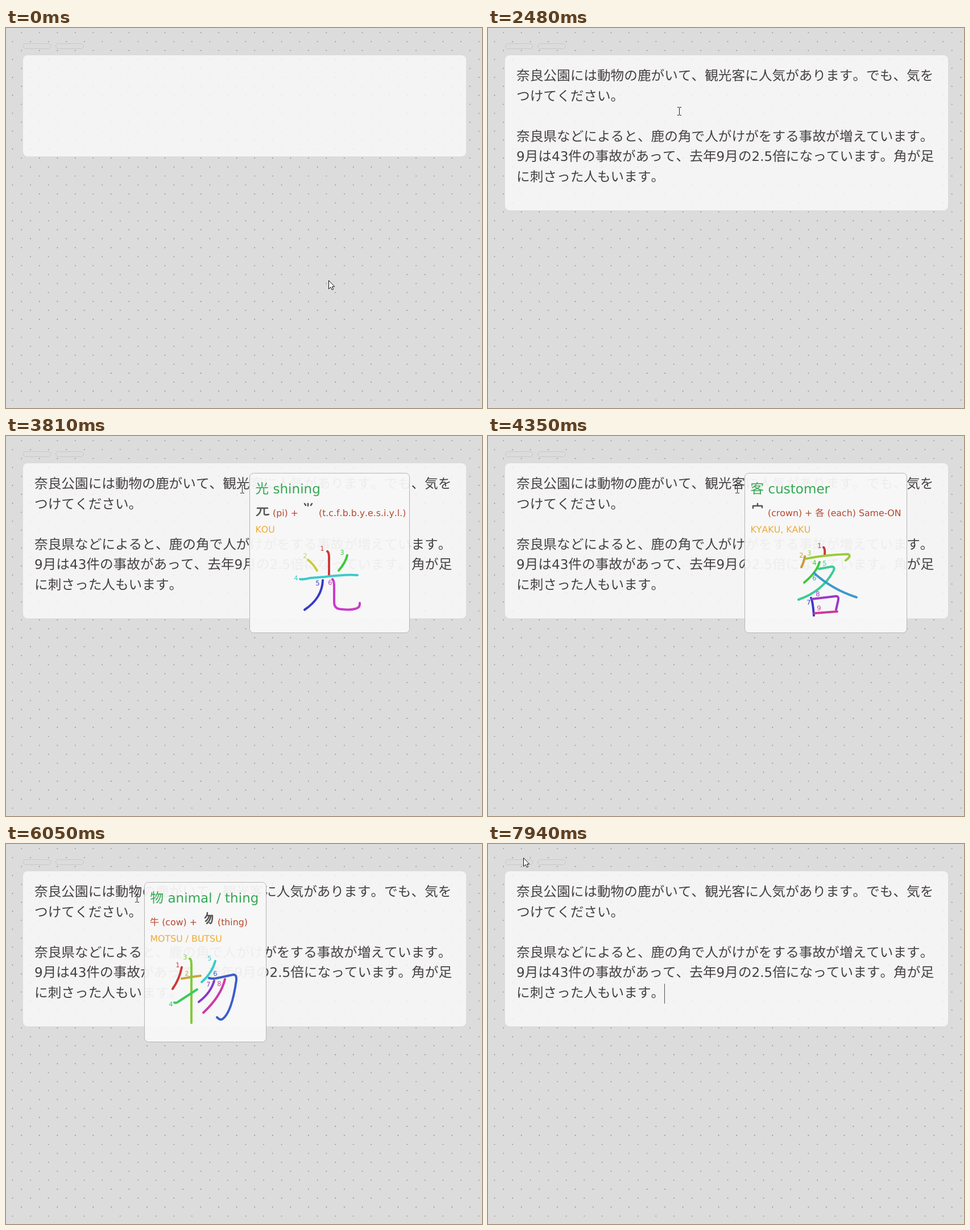
Recreate the animation shown at these times as an HTML page with a canvas. Size 837 by 669 pixels, loop 8000 ms.

```html
<!DOCTYPE html>
<html lang="ja">
<head>
<meta charset="utf-8">
<style>
html, body { margin: 0; width: 100%; height: 100%; overflow: hidden; background: #dcdcdc; }
canvas { display: block; }
</style>
</head>
<body>
<canvas id="stage" width="837" height="669"></canvas>
<script>
const ctx = document.getElementById('stage').getContext('2d');
const LOOP = 8000, PASTE = 1170;
const CJK = '"Noto Sans CJK JP", "Noto Sans CJK", sans-serif';
const LATIN = '"DejaVu Sans", sans-serif';

// Full-width characters keep an even pitch.
ctx.fontKerning = 'none';
ctx.textRendering = 'geometricPrecision';

const article = [
  '奈良公園には動物の鹿がいて、観光客に人気があります。でも、気を',
  'つけてください。',
  '',
  '奈良県などによると、鹿の角で人がけがをする事故が増えています。',
  '9月は43件の事故があって、去年9月の2.5倍になっています。角が足',
  'に刺さった人もいます。'
];

// Each stroke: number position, then path. Coordinates are absolute for a card at x, y.
const cards = {
  view: {
    x: 406, y: 65, w: 275, title: '観 point of view', reading: 'KAN',
    parts: [[447, '(swan) Same-ON + 見 (look)']],
    icon: 'M421 118L418 123M420 121H428M417 126H429M421 126L417 131M421 128V139M425 125V138M421 130H428M421 134H428M421 138H428',
    strokes: [
      '504 193M512 199Q506 215 488 232', '521 210M505 219Q525 217 537 215',
      '479 241M485 241L542 235', '509 226M515 223Q510 252 485 277',
      '498 275M504 257V314', '537 244M528 241Q528 249 523 257',
      '517 250M505 256L540 251', '532 261M524 257V300',
      '512 264M505 271L539 268', '515 280M505 287L541 283',
      '515 295M505 304L540 300', '543 223M550 208Q552 230 551 268',
      '561 201M552 209L582 205Q587 205 587 210L586 265', '562 220M553 229L585 225',
      '562 238M553 246L585 243', '562 256M553 265L585 261',
      '551 279M561 270Q560 295 536 314', '587 275M574 268V302Q574 311 584 311Q600 313 601 302'
    ]
  },
  shining: {
    x: 428, y: 65, w: 282, title: '光 shining', reading: 'KOU',
    parts: [[469, '(pi) +'], [550, '(t.c.f.b.b.y.e.s.i.y.l.)']],
    icon: 'M442 127H460M448 128Q448 136 441 140M454 128V137Q455 140 462 138M525 119L527 122M531 119V123M538 119L536 122',
    strokes: [
      '556 199M565 203Q568 205 568 213V245', '526 212M531 218Q541 226 547 237',
      '591 206M600 210Q597 223 585 237', '510 251M517 252Q522 253 535 250L560 248Q600 243 618 245',
      '548 260M557 254Q556 285 525 306', '570 259M574 252Q577 255 577 265V292Q577 305 590 305Q605 307 615 304Q623 302 622 294'
    ]
  },
  customer: {
    x: 451, y: 65, w: 286, title: '客 customer', reading: 'KYAKU, KAKU',
    parts: [[492, '(crown) + 各 (each) Same-ON']],
    icon: 'M474 119V122M466 127V123H482V126',
    strokes: [
      '583 194M590 196Q593 198 592 209', '551 211M557 212Q556 221 551 231',
      '565 207M559 216Q595 209 633 208Q640 211 629 219', '574 224M583 222Q578 240 556 258',
      '592 225M582 234L604 230Q612 230 606 240Q587 274 546 288', '574 251M573 241Q605 270 648 284',
      '564 294M568 285Q571 290 573 316', '580 279M570 287L612 282Q617 282 616 288L612 306',
      '582 304M574 312L614 309'
    ]
  },
  thing: {
    x: 243, y: 67, w: 215, title: '物 animal / thing', reading: 'MOTSU / BUTSU',
    parts: [[253, '牛 (cow) +'], [372, '(thing)']],
    icon: 'M354 121Q354 126 350 130M353 126H363Q363 138 360 140L358 139M357 127Q356 132 351 136M360 127Q359 135 353 140',
    strokes: [
      '302 214M309 217Q305 238 293 255', '318 229M309 237Q325 234 342 232',
      '315 200M323 202Q326 203 326 212V315', '290 283M296 279Q299 281 304 277L336 256',
      '358 202M368 206Q362 228 344 243', '368 229M357 236Q363 238 372 236L400 230Q406 230 405 240Q397 296 381 308Q376 311 371 305',
      '356 248M366 241Q360 262 339 278', '375 247M385 238Q378 268 347 297'
    ]
  }
};

// time, x, y
const path = [
  [80, 567, 444], [710, 313, 139], [1400, 313, 139], [1480, 326, 155], [2320, 326, 155],
  [2980, 393, 93], [3570, 393, 93], [3810, 415, 93], [4350, 438, 93], [4980, 438, 93],
  [5750, 230, 95], [7080, 230, 95], [7940, 62, 24]
];

const clamp = v => Math.max(0, Math.min(1, v));
const within = (t, a, b) => t >= a && t < b;
const fade = (t, a, b) => Math.min(clamp((t - a) / 150), clamp((b - t) / 150));

function pointer(t) {
  const i = path.findIndex(k => k[0] > t);
  if (i === 0) return path[0].slice(1);
  if (i < 0) return path.at(-1).slice(1);
  const [t0, x0, y0] = path[i - 1], [t1, x1, y1] = path[i];
  const p = (t - t0) / (t1 - t0), e = p * p * (3 - 2 * p);
  return [x0 + (x1 - x0) * e, y0 + (y1 - y0) * e];
}

// Latin and Japanese runs use different fonts.
function text(str, x, y, size, color) {
  ctx.fillStyle = color;
  ctx.textAlign = 'left';
  ctx.textBaseline = 'alphabetic';
  for (const run of str.match(/[ -~]+|[^ -~]+/g) || []) {
    ctx.font = run[0] <= '~' ? `${size * .975}px ${LATIN}` : `350 ${size}px ${CJK}`;
    ctx.fillText(run, x, y);
    x += ctx.measureText(run).width;
  }
}

function box(x, y, w, h, r, fill, stroke) {
  ctx.beginPath();
  ctx.roundRect(x, y, w, h, r);
  if (fill) { ctx.fillStyle = fill; ctx.fill(); }
  if (stroke) { ctx.lineWidth = 1; ctx.strokeStyle = stroke; ctx.stroke(); }
}

function background() {
  ctx.fillStyle = '#dcdcdc';
  ctx.fillRect(0, 0, 837, 669);
  ctx.fillStyle = '#808080';
  for (let row = 0; row < 42; row++) {
    for (let col = 0; col < 27; col++) {
      ctx.beginPath();
      ctx.arc((row % 2 ? 11.5 : 27.2) + col * 31.54, 8 + row * 15.78, .85, 0, 7);
      ctx.fill();
    }
  }
  box(30.5, 27.5, 48, 9, 4.5, null, '#c9c9c9');
  box(87.5, 27.5, 49, 9, 4.5, null, '#c9c9c9');
}

function drawCard(card, x, y, alpha) {
  ctx.save();
  ctx.globalAlpha = alpha;
  ctx.translate(Math.round(x - card.x), Math.round(y - card.y));
  box(card.x + .5, card.y + .5, card.w - 1, 281, 7, 'rgba(248,248,248,.94)', '#b4b4b4');
  const left = card.x + 10.5;
  text(card.title, left, card.y + 35.5, 23.67, '#34a853');
  for (const [px, str] of card.parts) text(str, px, card.y + 76, 16.2, '#b5472f');
  text(card.reading, left, card.y + 104.5, 16.2, '#eeaa33');

  ctx.lineCap = ctx.lineJoin = 'round';
  ctx.lineWidth = 2.5;
  ctx.strokeStyle = '#555';
  ctx.stroke(new Path2D(card.icon));

  ctx.lineWidth = 4;
  ctx.font = `11.5px ${LATIN}`;
  ctx.textAlign = 'center';
  ctx.textBaseline = 'middle';
  card.strokes.forEach((s, i) => {
    const cut = s.indexOf('M'), [nx, ny] = s.slice(0, cut).split(' ').map(Number);
    ctx.strokeStyle = ctx.fillStyle = `hsl(${i * 360 / card.strokes.length}, 58%, 51%)`;
    ctx.stroke(new Path2D(s.slice(cut)));
    ctx.fillText(i + 1, nx, ny);
  });
  ctx.restore();
}

function drawPointer(x, y, beam) {
  ctx.save();
  ctx.translate(Math.round(x), Math.round(y));
  ctx.lineWidth = 1;
  ctx.lineCap = 'butt';
  ctx.lineJoin = 'miter';
  if (beam) {
    ctx.strokeStyle = '#222';
    ctx.stroke(new Path2D('M-3 -6.5H0M1 -6.5H4M.5 -6V7M-3 7.5H0M1 7.5H4'));
  } else {
    const arrow = new Path2D('M.5 .5V15.5L4 12.2L6.3 17L8.6 16L6.4 11.3H10.7Z');
    ctx.fillStyle = '#fff';
    ctx.fill(arrow);
    ctx.strokeStyle = '#111';
    ctx.stroke(arrow);
  }
  ctx.restore();
}

function caret(x, y) {
  ctx.fillStyle = '#555';
  ctx.fillRect(x, y, 1, 35);
}

function draw(t) {
  const pasted = t >= PASTE, bottom = pasted ? 321 : 226;
  const [x, y] = pointer(t);
  background();
  box(30, 48, 779, bottom - 48, 8, 'rgba(250,250,250,.8)');
  if (pasted) article.forEach((line, i) => text(line, 50, 92 + i * 35.5, 23.67, '#454043'));
  if (within(t, 640, PASTE)) caret(50, 67);
  if (within(t, 1750, 2320) || t >= 7300) caret(310, 246);

  const alpha = Math.max(fade(t, 2700, 5200), fade(t, 5680, 7230));
  if (alpha > 0) {
    const name = t > 5400 ? 'thing' : t > 4980 || x > 428 ? 'customer' : x > 404.5 ? 'shining' : 'view';
    drawCard(cards[name], x + 13, y - 28, alpha);
  }
  drawPointer(x, y, x >= 30 && x < 809 && y >= 48 && y < bottom);
}

const start = performance.now();
function tick() {
  draw((performance.now() - start) % LOOP);
  requestAnimationFrame(tick);
}
tick();
</script>
</body>
</html>
```
